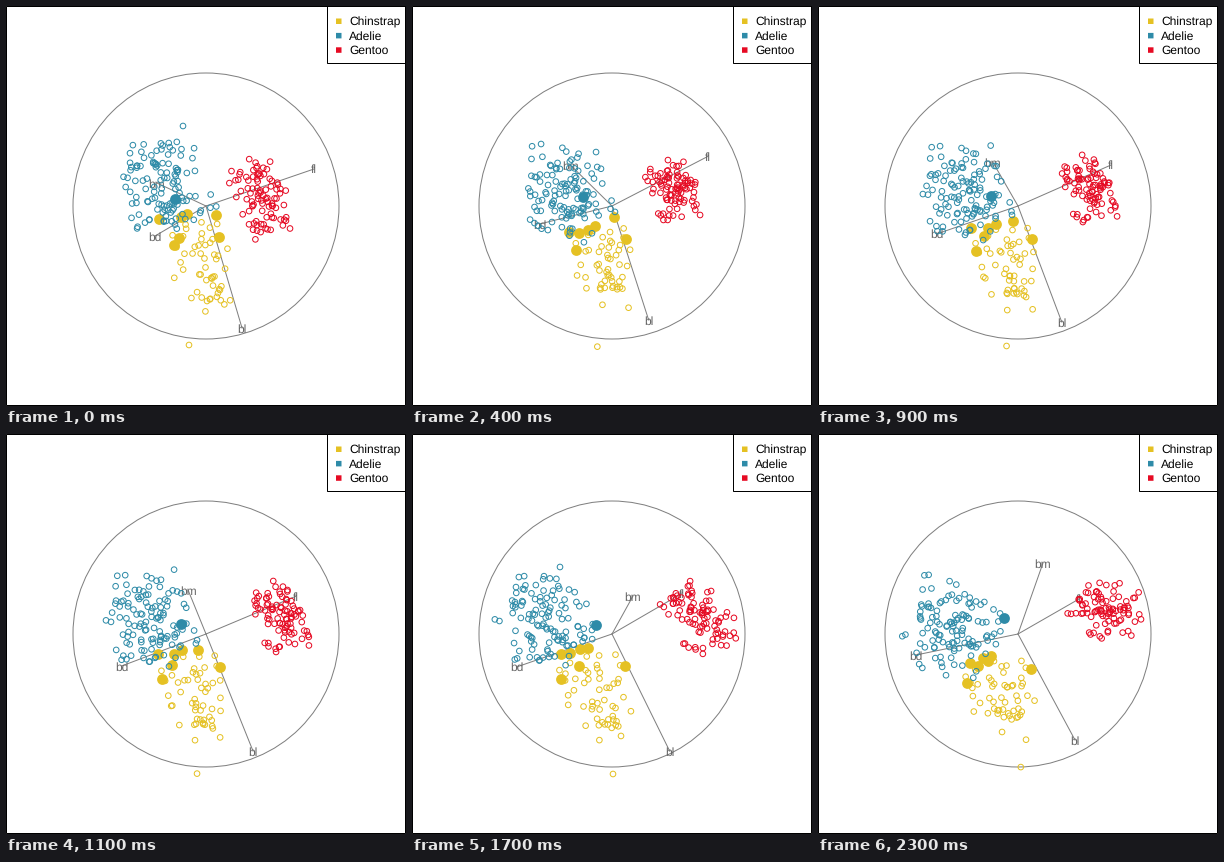
Recreate the animation shown at these times as a matplotlib script. Size 400x400 px, loop 2.4 s.

```python
import numpy as np
import matplotlib.pyplot as plt
from matplotlib.animation import FuncAnimation
from matplotlib.patches import Circle, Rectangle

plt.rcParams["text.hinting"] = "none"

SIZE, MID, RADIUS = 400, 200, 133
PX = 0.72  # points per pixel at 100 dpi
FRAMES, INTERVAL = 24, 100
SPREAD = 0.367
GREY = "#7f7f7f"
FONT = dict(family="Liberation Sans", fontsize=12 * PX)

# Tour stops: where each variable's axis ends, x row then y row
NAMES = ["bl", "fl", "bd", "bm"]
TOUR = {
    0: [[36, 108, -51, -49], [122, -37, 30, -23]],
    6: [[37, 90, -83, -38], [110, -56, 12, -50]],
    10: [[46, 94, -80, -21], [118, -36, 33, -42]],
    13: [[49, 81, -93, -11], [115, -41, 30, -46]],
    18.5: [[61, 65, -96, 33], [118, -40, 34, -35]],
    23: [[57, 61, -102, 25], [106, -35, 21, -71]],
}

# Overall mean and sd of the four measures
CENTRE = np.array([43.99, 200.97, 17.16, 4207])
SCALE = np.array([5.47, 14.0, 1.97, 805])

# colour, count, mean, sd, correlation between measures
SPECIES = {
    "Chinstrap": ("#E5C123", 52, [49.3, 196, 18.4, 3740], [2.9, 5.5, 0.95, 330], 0.6),
    "Adelie": ("#2E8BA8", 118, [38.8, 190.1, 18.35, 3706], [2.66, 6.5, 1.22, 459], 0.4),
    "Gentoo": ("#E60A23", 90, [47.4, 217, 15.0, 5092], [2.7, 5.6, 0.85, 450], 0.69),
}

# Highlighted birds: screen spots at two moments fix their 4-D position
MOMENTS = (0, 17)
SOLID = {
    "Chinstrap": [
        (153, 213, 149, 220), (175, 211, 158, 219), (181, 208, 168, 215),
        (210, 209, 176, 214), (213, 231, 213, 232), (173, 232, 167, 232),
        (168, 239, 149, 245),
    ],
    "Adelie": [(169, 193, 184, 191)],
}
OUTLIERS = {
    "Chinstrap": [(183, 339, 201, 340)],
    "Adelie": [(177, 120, 148, 133)],
}


def basis(t):
    """2 x 4 projection at time t, linear between tour stops."""
    ends = np.reshape(list(TOUR.values()), (len(TOUR), 8)).T
    return np.reshape([np.interp(t, list(TOUR), e) for e in ends], (2, 4))


def locate(spots):
    views = np.vstack([basis(t) for t in MOMENTS])
    return np.linalg.solve(views, np.array(spots).T - MID).T


def sample(rng, count, mean, sd, cor):
    root = np.linalg.cholesky(cor + (1 - cor) * np.eye(4))
    noise = rng.uniform(-1.85, 1.85, (count, 4))
    raw = mean + noise @ root.T * sd
    return (raw - CENTRE) / SCALE * SPREAD


fig = plt.figure(figsize=(SIZE / 100, SIZE / 100), dpi=100, facecolor="white")
ax = fig.add_axes([0, 0, 1, 1])
ax.set(xlim=(0, SIZE), ylim=(SIZE, 0))
ax.axis("off")


def box(x, y, w, h, **style):
    ax.add_patch(Rectangle((x, y), w, h, snap=False, **style))


def dots(color, birds, z, solid=False):
    size = (10.8 if solid else 5.6) * PX
    art = ax.scatter([], [], s=size ** 2, lw=0 if solid else PX,
                     fc=color if solid else "none", ec=color, zorder=z)
    art.set_snap(False)
    return art, birds


ax.add_patch(Circle((MID, MID), RADIUS, fill=False, ec=GREY, lw=PX, zorder=1))
spokes = [ax.plot([], [], color=GREY, lw=PX, zorder=1)[0] for _ in NAMES]
labels = [ax.text(0, 0, n, color="#666666", ha="center", zorder=1, **FONT)
          for n in NAMES]

rng = np.random.default_rng(7)
clouds = []
box(0.5, 0.5, SIZE - 1, SIZE - 1, fill=False, ec="black", lw=PX, zorder=8)
box(321.5, 0.5, 78, 57, fc="white", ec="black", lw=PX, zorder=7)

for row, (name, (color, *shape)) in enumerate(SPECIES.items()):
    clouds.append(dots(color, sample(rng, *shape), row + 2))
    if name in OUTLIERS:
        clouds.append(dots(color, locate(OUTLIERS[name]), row + 2))
    if name in SOLID:
        clouds.append(dots(color, locate(SOLID[name]), row + 2, solid=True))
    y = 15 + 14.4 * row
    box(330, y - 2.5, 5.5, 5.5, fc=color, lw=0, zorder=9)
    ax.text(343.4, y + 4.4, name, color="black", zorder=9, **FONT)


def draw(frame):
    view = basis(frame)
    for line, label, (x, y) in zip(spokes, labels, MID + view.T):
        line.set_data([MID, x], [MID, y])
        label.set_position((x, y + 4.4))
    for art, birds in clouds:
        art.set_offsets(MID + birds @ view.T)
    return spokes + labels + [art for art, _ in clouds]


anim = FuncAnimation(fig, draw, frames=FRAMES, interval=INTERVAL,
                     init_func=lambda: draw(0), repeat=True, repeat_delay=0)
plt.show()
```
